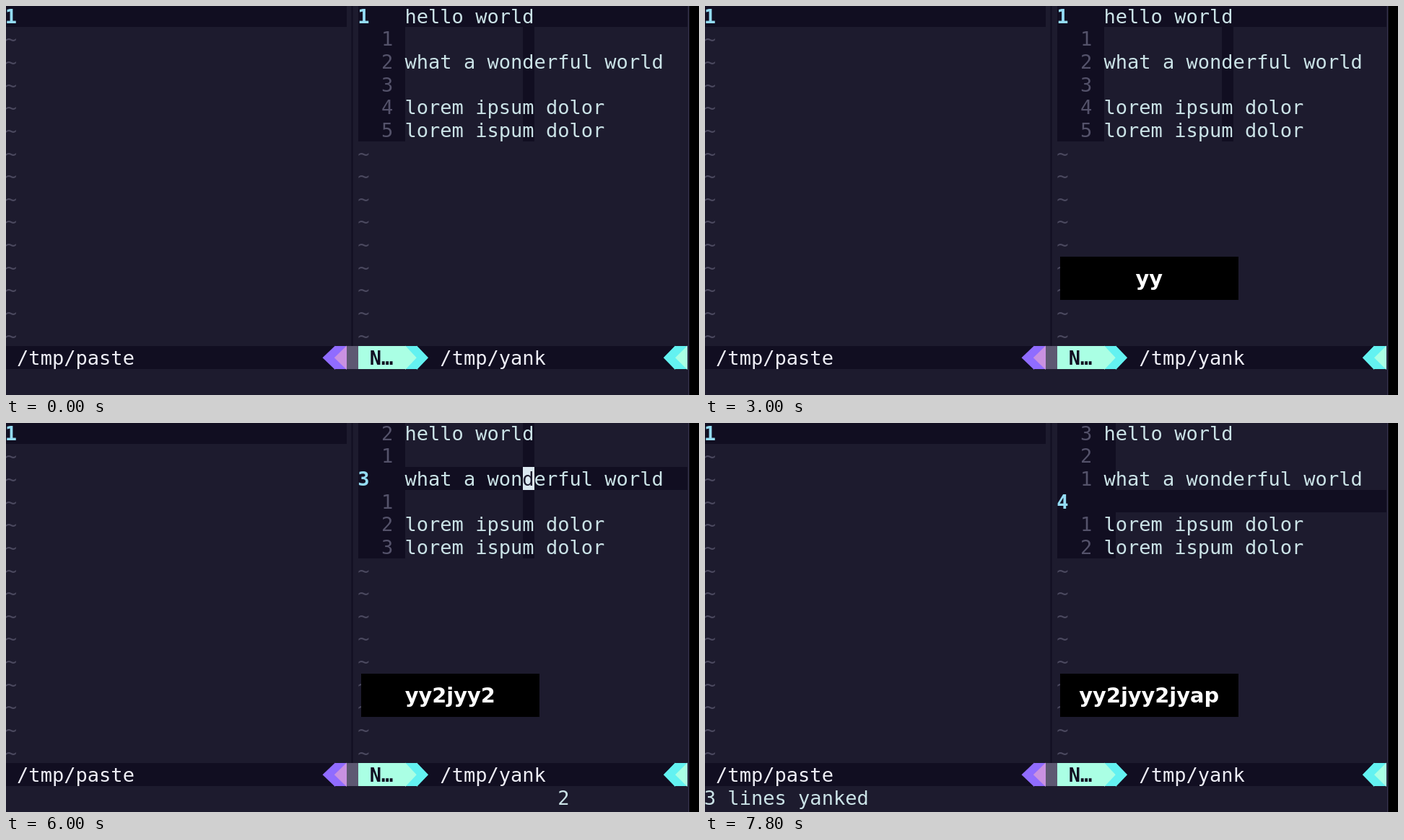
Recreate the animation shown at these times as an HTML page with a canvas. Size 960 by 540 pixels, loop 8 s.

```html
<!DOCTYPE html>
<html lang="en">
<head>
<meta charset="utf-8">
<title>Yank demo</title>
<style>
html, body { margin: 0; width: 100%; height: 100%; overflow: hidden; background: #000; }
canvas { display: block; width: 960px; height: 540px; }
</style>
</head>
<body>
<canvas id="stage" width="960" height="540"></canvas>
<script>
const ctx = document.getElementById('stage').getContext('2d');
const LOOP = 8000, TICK = 300, BLINK = 600;
const CELL_W = 16.27, CELL_H = 31.65, Y0 = -2.3;
const GLYPH_W = 16.285, GLYPH_X = -1.2;
const MONO = '27.05px "DejaVu Sans Mono", monospace';
const SANS = 'bold 28.8px "DejaVu Sans", sans-serif';
const KEYS_X = 615.2;
const C = {
  bg: '#1d1b2e', dark: '#110e21', text: '#cbe3e7', dim: '#54526a', tilde: '#4b495f',
  num: '#94dcf4', status: '#eeeef6', gray: '#5d5872', purple: '#906cff',
  pink: '#c991e1', cyan: '#63f2f1', mint: '#aaffe4', cursor: '#dbe8f0', edge: '#38344f'
};
const LINES = ['hello world', '', 'what a wonderful world', '', 'lorem ipsum dolor', 'lorem ispum dolor'];
const LEFT_COLS = 29, PANE = 30, BODY = 34, END = 58, STATUS = 15;

// Editor state after each key press; yank holds the first and last flashed rows.
const STEPS = [
  { at: 0, keys: '', row: 0, col: 10 },
  { at: 2400, keys: 'yy', row: 0, col: 10, yank: [0, 0] },
  { at: 3300, keys: 'yy2', row: 0, col: 10, pending: '2' },
  { at: 3600, keys: 'yy2j', row: 2, col: 10 },
  { at: 3900, keys: 'yy2jyy', row: 2, col: 10, yank: [2, 2] },
  { at: 5700, keys: 'yy2jyy2', row: 2, col: 10, pending: '2' },
  { at: 6300, keys: 'yy2jyy2j', row: 4, col: 10 },
  { at: 6600, keys: 'yy2jyy2jya', row: 4, col: 10, pending: 'ya' },
  { at: 6900, keys: 'yy2jyy2jyap', row: 3, col: 0, yank: [3, 5], message: '3 lines yanked' }
];

const colX = c => Math.round(c * CELL_W);
const glyphX = c => GLYPH_X + c * GLYPH_W;
const rowY = r => Y0 + r * CELL_H;

function rect(x, y, w, h, color) {
  ctx.fillStyle = color;
  ctx.fillRect(x, y, w, h);
}

// Fills whole cells, snapped to pixels so neighbours leave no seams.
function cells(col, row, w, h, color) {
  const x = colX(col), y = Math.round(rowY(row));
  rect(x, y, colX(col + w) - x, Math.round(rowY(row + h)) - y, color);
}

function write(text, col, row, color, bold) {
  ctx.font = (bold ? 'bold ' : '') + MONO;
  ctx.textAlign = 'left';
  ctx.fillStyle = color;
  ctx.fillText(text, glyphX(col), rowY(row) + 25.9);
}

// Triangle glyph, a little taller than its cell.
function arrow(col, dir, color) {
  const tip = glyphX(dir > 0 ? col + 1 : col), base = colX(dir > 0 ? col : col + 1);
  const y = rowY(STATUS);
  ctx.fillStyle = color;
  ctx.beginPath();
  ctx.moveTo(base, y - 1);
  ctx.lineTo(tip, y + CELL_H / 2);
  ctx.lineTo(base, y + CELL_H + 1);
  ctx.fill();
}

function drawLeft() {
  cells(0, 0, LEFT_COLS, 1, C.dark);
  write('1', 0, 0, C.num, true);
  for (let r = 1; r < STATUS; r++) write('~', 0, r, C.tilde);
  rect(478.5, 0, 2, 472, C.dark);
}

function drawRight(s, flash, cursorOn) {
  cells(PANE, 0, 4, LINES.length, C.dark);
  cells(BODY + s.col, 0, 1, LINES.length, C.dark);
  cells(PANE, s.row, END - PANE, 1, C.dark);
  LINES.forEach((line, r) => {
    const here = r === s.row;
    const lit = flash && r >= s.yank[0] && r <= s.yank[1];
    write(here ? r + 1 : Math.abs(r - s.row), here ? PANE : 32, r, here ? C.num : C.dim, here);
    if (lit) cells(BODY, r, line.length, 1, C.text);
    write(line, BODY, r, lit ? C.bg : C.text);
    if (here && cursorOn) {
      const ch = line[s.col] || ' ', inverted = lit && line;
      cells(BODY + s.col, r, 1, 1, inverted ? C.dark : line ? C.cursor : C.text);
      write(ch, BODY + s.col, r, inverted ? C.text : C.bg);
    }
  });
  for (let r = LINES.length; r < STATUS; r++) write('~', PANE, r, C.tilde);
}

function drawStatus(s) {
  cells(0, STATUS, END, 1, C.dark);
  write('/tmp/paste', 1, STATUS, C.status);
  arrow(27, -1, C.purple);
  cells(28, STATUS, 1, 1, C.purple);
  arrow(28, -1, C.pink);
  cells(LEFT_COLS, STATUS, 1, 1, C.gray);
  cells(PANE, STATUS, 4, 1, C.mint);
  write('N…', 31, STATUS, C.dark, true);
  cells(BODY, STATUS, 1, 1, C.cyan);
  arrow(BODY, 1, C.mint);
  arrow(35, 1, C.cyan);
  write('/tmp/yank', 37, STATUS, C.status);
  arrow(56, -1, C.cyan);
  cells(57, STATUS, 1, 1, C.cyan);
  arrow(57, -1, C.mint);
  if (s.message) write(s.message, 0, STATUS + 1, C.text);
  if (s.pending) write(s.pending, 47, STATUS + 1, C.text);
}

function drawKeys(keys, fresh) {
  if (!keys) return;
  rect(492, 348, 247, 60, '#000');
  ctx.font = SANS;
  ctx.textAlign = 'center';
  ctx.fillStyle = '#fff';
  ctx.fillText(keys, KEYS_X, 388);
  if (fresh) {
    const w = ctx.measureText(keys.slice(-1)).width;
    rect(KEYS_X + ctx.measureText(keys).width / 2 - w, 388.5, w, 1.5, '#d0d0d0');
  }
}

function render(ms) {
  const t = Math.floor((ms % LOOP) / TICK) * TICK;
  const s = STEPS.filter(step => step.at <= t).pop();
  const age = t - s.at, fresh = s.at > 0 && age < TICK;
  const shown = Math.floor(age / BLINK) % 2 === (s.at ? 0 : 1);
  rect(0, 0, 960, 540, C.bg);
  drawLeft();
  drawRight(s, fresh && s.yank, shown);
  drawStatus(s);
  drawKeys(s.keys, fresh);
  rect(945, 0, 1.5, 540, C.edge);
  rect(946.5, 0, 13.5, 540, '#000');
}

let start;
function loop(now) {
  start ??= now;
  render(now - start);
  requestAnimationFrame(loop);
}
requestAnimationFrame(loop);
</script>
</body>
</html>
```
